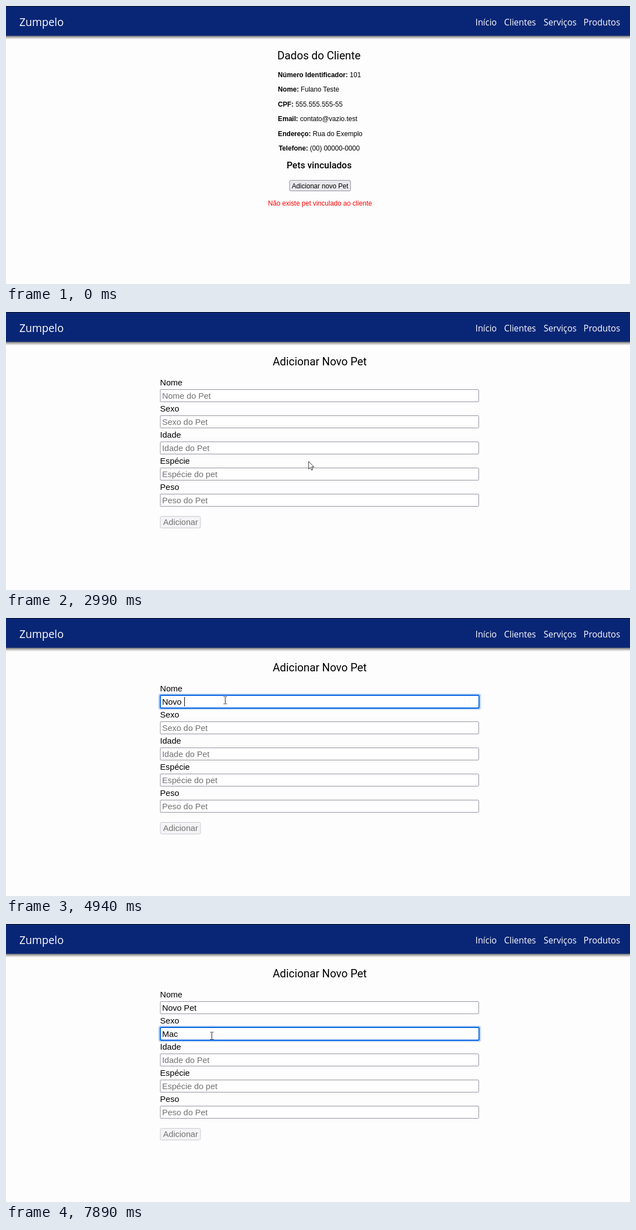
Animation, 1120 px wide and 500 px high, one loop 8000 ms. Source, as an HTML page:

```html
<!DOCTYPE html>
<html lang="pt-BR">
<head>
<meta charset="utf-8">
<title>Cadastro de pet</title>
<style>
  html, body { margin: 0; width: 100%; height: 100%; overflow: hidden; background: #fdfdfd; }
  svg { display: block; }
  text { white-space: pre; font-family: "Liberation Sans", Arial, sans-serif; }
  .nav { font-family: "Open Sans", "Noto Sans", sans-serif; font-size: 15.45px; fill: #fff; }
  .brand { font-size: 19.2px; }
  .title { font-family: Roboto, sans-serif; font-size: 19.8px; }
  .sub { font-size: 16.45px; font-weight: 500; }
  .small { font-size: 12.08px; }
  .form { font-size: 15px; }
  .hint { fill: #707070; }
  .error { fill: #f00; }
  .label { font-weight: bold; }
</style>
</head>
<body>
<svg id="stage" width="1120" height="500" viewBox="0 0 1120 500">
  <defs>
    <linearGradient id="shade" x2="0" y2="1">
      <stop offset="0" stop-opacity=".6"/>
      <stop offset=".5" stop-opacity=".27"/>
      <stop offset="1" stop-opacity="0"/>
    </linearGradient>
  </defs>
  <rect width="1120" height="500" fill="#fdfdfd"/>
  <rect y="53" width="1120" height="7" fill="url(#shade)"/>
  <rect width="1120" height="53.5" fill="#092676"/>
  <rect width="1120" height="1" fill="#0b0d16"/>
  <g id="nav"></g>
  <g id="client"></g>
  <g id="petForm"></g>
  <path id="arrow" d="M.5 .5V14.3L3.7 11.3L5.8 16.2L8 15.2L5.9 10.5H10.2Z" fill="#fff" stroke="#111" stroke-width=".9"/>
  <path id="beam" d="M-3 -6.5H-.8L0 -5.8L.8 -6.5H3M0 -5.8V5.8M-3 6.5H-.8L0 5.8L.8 6.5H3" fill="none" stroke="#222"/>
</svg>
<script>
const LOOP = 8000, FORM_AT = 2460, PRESS_AT = 2260, ROW = 47.1;
const byId = id => document.getElementById(id);

function add(parent, tag, attrs, text = '') {
  const el = document.createElementNS('http://www.w3.org/2000/svg', tag);
  set(el, attrs);
  el.textContent = text;
  parent.appendChild(el);
  return el;
}
function set(el, attrs) {
  for (const key in attrs) el.setAttribute(key, attrs[key]);
}
const write = (parent, cls, x, y, text) => add(parent, 'text', { class: cls, x, y }, text);
const show = (el, on) => set(el, { visibility: on ? 'inherit' : 'hidden' });

// Header
const nav = byId('nav');
write(nav, 'nav brand', 24, 36, 'Zumpelo');
[[842.6, 'Início'], [894, 'Clientes'], [965, 'Serviços'], [1036.6, 'Produtos']]
  .forEach(([x, text]) => write(nav, 'nav', x, 35, text));

// Client page
const client = byId('client');
write(client, 'title', 487, 95.5, 'Dados do Cliente');
[
  ['Número Identificador:', '101'],
  ['Nome:', 'Fulano Teste'],
  ['CPF:', '555.555.555-55'],
  ['Email:', 'contato@vazio.test'],
  ['Endereço:', 'Rua do Exemplo'],
  ['Telefone:', '(00) 00000-0000']
].forEach(([label, value], i) => {
  const row = write(client, 'small', i === 5 ? 489.4 : 488.1, 127.5 + 26.5 * i, '');
  add(row, 'tspan', { class: 'label' }, label);
  add(row, 'tspan', {}, ' ' + value);
});
write(client, 'title sub', 503.7, 292, 'Pets vinculados');
const button = add(client, 'rect', { x: 509, y: 313.5, width: 109.5, height: 19, rx: 2.5 });
write(client, 'small', 513, 328, 'Adicionar novo Pet');
write(client, 'small error', 470.3, 358.5, 'Não existe pet vinculado ao cliente');

// Pet form
const petForm = byId('petForm');
write(petForm, 'title', 478.7, 95.5, 'Adicionar Novo Pet');
const fields = [
  ['Nome', 'Nome do Pet'],
  ['Sexo', 'Sexo do Pet'],
  ['Idade', 'Idade do Pet'],
  ['Espécie', 'Espécie do pet'],
  ['Peso', 'Peso do Pet']
].map(([label, hint], i) => {
  const top = Math.round(139 + ROW * i);
  const halo = add(petForm, 'rect', { x: 273.5, y: top - 3, width: 579, height: 29, rx: 4, fill: '#b6d1f7' });
  const box = add(petForm, 'rect', { fill: '#fff' });
  write(petForm, 'form', 276.6, 131.6 + ROW * i, label);
  const text = write(petForm, 'form', 280.2, 155.8 + ROW * i, hint);
  return { top, hint, halo, box, text };
});
add(petForm, 'rect', { x: 277, y: 367.5, width: 72, height: 21, rx: 2.5, fill: '#f4f4f6', stroke: '#c7c7ce' });
write(petForm, 'form hint', 282.1, 383.3, 'Adicionar');
const caret = add(petForm, 'rect', { width: 1, height: 17 });

// Pointer: first step, last step, number of steps, destination x, y
const moves = [
  [410, 410, 1, 1013, 469],
  [480, 620, 3, 745, 372],
  [1020, 1370, 6, 661, 337],
  [1440, 1780, 5, 616, 325],
  [1850, 1920, 2, 596.5, 324],
  [2920, 3330, 7, 408, 129],
  [3400, 3600, 3, 393.5, 148.5],
  [6200, 6200, 1, 390.5, 154.5],
  [6270, 6630, 6, 369.5, 201.5]
];
// Typing: time, field, text after the key
const keys = [
  [4410, 0, 'N'], [4610, 0, 'No'], [4740, 0, 'Nov'], [4810, 0, 'Novo'], [4940, 0, 'Novo '],
  [5350, 0, 'Novo P'], [5480, 0, 'Novo Pe'], [5600, 0, 'Novo Pet'],
  [7360, 1, 'M'], [7560, 1, 'Ma'], [7760, 1, 'Mac']
];
const focusAt = [[0, -1], [3750, 0], [6830, 1]];
const blink = [[0, 0], [3750, 1], [4280, 0], [4410, 1], [5940, 0], [6470, 1], [7230, 0], [7360, 1], [7890, 0]];
const latest = (table, t) => table.filter(row => row[0] <= t).pop();

function pointerAt(t) {
  let x = 1040, y = 480;
  for (const [start, end, steps, toX, toY] of moves) {
    if (t < start) break;
    const gap = (end - start) / (steps - 1 || 1) || 1;
    const step = Math.min(steps, Math.floor((t - start) / gap + 1e-6) + 1);
    x += (toX - x) * step / steps;
    y += (toY - y) * step / steps;
  }
  return { x, y };
}

function drawButton(t, { x, y }) {
  const over = x >= 509 && x < 615 && y >= 313 && y < 333;
  const [fill, stroke] = over && t >= PRESS_AT ? ['#b1b1b9', '#484851']
    : over ? ['#d0d0d7', '#676774'] : ['#e9e9ed', '#8f8f9d'];
  set(button, { fill, stroke });
}

function drawFields(t, hovered) {
  const focus = latest(focusAt, t)[1];
  fields.forEach((field, i) => {
    const { top, halo, box, text, hint } = field;
    const key = latest(keys.filter(k => k[1] === i), t);
    const focused = i === focus;
    text.textContent = key ? key[2] : hint;
    set(text, { class: key ? 'form' : 'form hint' });
    show(halo, focused);
    set(box, focused
      ? { x: 277, y: top, width: 572, height: 23, rx: 2, stroke: '#0060df', 'stroke-width': 1.8 }
      : { x: 277, y: top + .5, width: 571.5, height: 22, rx: 1, stroke: field === hovered ? '#676774' : '#8f8f9d', 'stroke-width': 1 });
    if (focused) {
      const width = key ? text.getComputedTextLength() : 0;
      set(caret, { x: Math.ceil(280 + width), y: top + 3 });
    }
  });
  show(caret, latest(blink, t)[1]);
}

function draw(t) {
  const onForm = t >= FORM_AT;
  const pos = pointerAt(t);
  const hovered = onForm && fields.find(f => pos.x > 277 && pos.x < 849 && pos.y >= f.top && pos.y < f.top + 23);
  show(client, !onForm);
  show(petForm, onForm);
  drawButton(t, pos);
  drawFields(t, hovered);
  const arrow = byId('arrow'), beam = byId('beam');
  show(arrow, t >= 410 && !hovered);
  show(beam, hovered);
  set(arrow, { transform: `translate(${pos.x} ${pos.y})` });
  set(beam, { transform: `translate(${Math.floor(pos.x) + .5} ${Math.floor(pos.y)})` });
}

const begin = performance.now();
function tick() {
  draw((performance.now() - begin) % LOOP);
  requestAnimationFrame(tick);
}
tick();
</script>
</body>
</html>
```
